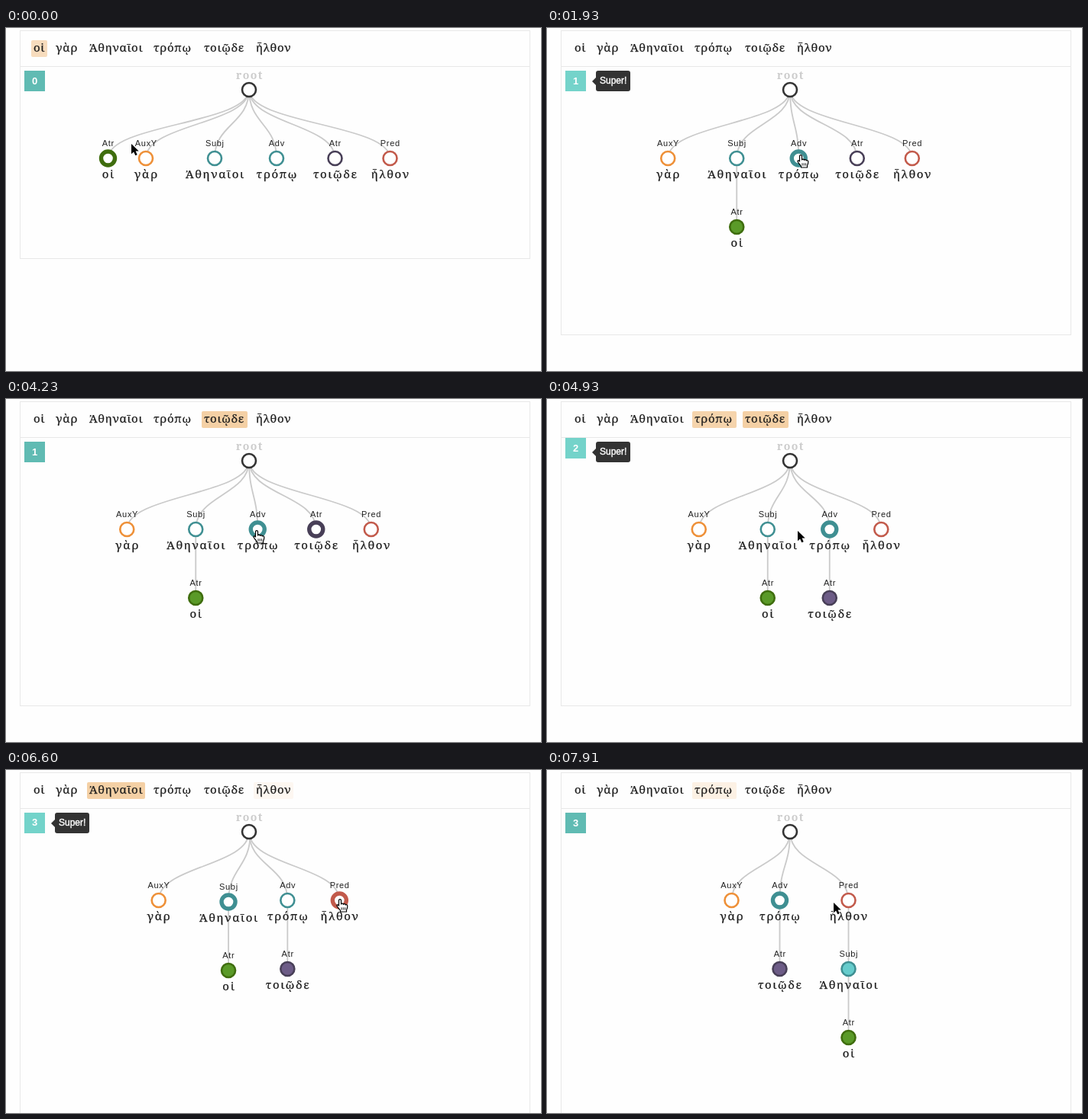
These frames come from a looping animation (700 px wide and 450 px high, 8000 ms). An HTML page:

```html
<!DOCTYPE html>
<html lang="en">
<head>
<meta charset="utf-8">
<title>Treebank exercise</title>
<style>
  html, body { margin: 0; width: 100%; height: 100%; overflow: hidden; background: #fefefe; }
  svg { display: block; }
  text { fill: #222; font: 11px "Liberation Sans", Arial, sans-serif; }
  .greek { font: 15px "Noto Serif", "DejaVu Sans", serif; letter-spacing: .7px;
    fill: #1c1c1c; stroke: #1c1c1c; stroke-width: .25px; }
  .tree { letter-spacing: 1.65px; text-anchor: middle; }
  .label { letter-spacing: .7px; text-anchor: middle; }
  .root { font: bold 14px "Noto Serif", serif; letter-spacing: 1.4px; text-anchor: middle; fill: #ccc; }
  .count { font-size: 13px; font-weight: bold; text-anchor: middle; fill: #fff; }
  .tip { font-size: 12px; fill: #fff; stroke: #fff; stroke-width: .4px; }
  .frame { fill: none; stroke: #e8e8e8; }
  .link { fill: none; stroke: #cacaca; stroke-width: 1.8px; }
</style>
</head>
<body>
<svg id="stage" width="700" height="450" viewBox="0 0 700 450"></svg>
<script>
const LOOP = 8000, STEPS = 91, STEP = LOOP / STEPS;
const ROOT = { x: 318, y: 81 }, LEVEL = 90, UNIT = 4.5, MOVE_TIME = 500;
const RING_REACH = 13, HAND_REACH = 19.3;

const words = [
  { text: 'οἱ', tag: 'Atr', w: 21, ring: '#3f6d0e', fill: '#5a9a28' },
  { text: 'γὰρ', tag: 'AuxY', w: 36, ring: '#ee9038', fill: '#fff' },
  { text: 'Ἀθηναῖοι', tag: 'Subj', w: 76, ring: '#3f8f92', fill: '#66cccc' },
  { text: 'τρόπῳ', tag: 'Adv', w: 58, ring: '#3f8f92', fill: '#66cccc' },
  { text: 'τοιῷδε', tag: 'Atr', w: 60, ring: '#483f57', fill: '#6d5c87' },
  { text: 'ἦλθον', tag: 'Pred', w: 52, ring: '#c25a4b', fill: '#fff' }
];

// A word is picked, then dropped on its head; times are in steps
const acts = [
  { child: 0, head: 2, pick: -5, drop: 7.45, clear: 17, hush: 40 },
  { child: 4, head: 3, pick: 39.5, drop: 49.8, clear: 57, hush: 60 },
  { child: 2, head: 5, pick: 66.5, drop: 74, clear: 82, hush: 85 },
  { child: 3, head: -1, pick: 88, drop: Infinity, clear: Infinity, hush: Infinity }
];

// Where the pointer rests
const stops = [
  { from: 0, to: 0, x: 164, y: 152 },
  { from: 5, to: 17, x: 268, y: 172 },
  { from: 22, to: 25, x: 332, y: 167 },
  { from: 28, to: 39, x: 404, y: 168 },
  { from: 45, to: 59, x: 328, y: 173 },
  { from: 63, to: 66, x: 289, y: 172 },
  { from: 72, to: 76, x: 437, y: 170 },
  { from: 80, to: 83, x: 365, y: 172 },
  { from: 87, to: 88, x: 304, y: 172 },
  { from: 90, to: STEPS, x: 375, y: 174 }
];

const clamp = v => Math.min(1, Math.max(0, v));
const lerp = (a, b, p) => a + (b - a) * p;
const mix = (a, b, p) => ({ x: lerp(a.x, b.x, p), y: lerp(a.y, b.y, p) });
const ease = p => p < .5 ? 4 * p ** 3 : 1 - 4 * (1 - p) ** 3;
const bump = (t, mid, width) => Math.exp(-(((t - mid) / width) ** 2));
const near = (a, b, reach) => Math.hypot(a.x - b.x, a.y - b.y) < reach;
const size = i => Math.max(words[i].text.normalize('NFC').length, words[i].tag.length);
const dropped = k => acts.filter(a => k >= a.drop);

// Tidy tree: neighbours stand apart by their lengths, and so do their descendants
function layout(done) {
  const up = words.map(() => -1);
  acts.slice(0, done).forEach(a => up[a.child] = a.head);
  const chain = i => i < 0 ? [] : [i, ...chain(up.indexOf(i))];
  const chains = words.map((_, i) => i).filter(i => up[i] < 0).map(chain);
  let end = 0;
  const xs = chains.map((c, j) => {
    if (!j) return 0;
    const left = chains[j - 1];
    const gaps = c.slice(0, left.length).map((i, d) =>
      d ? 2 * size(left[d]) + size(i) : 2 * size(i) + size(left[d]));
    return end += UNIT * Math.max(...gaps);
  });
  const at = { '-1': ROOT };
  chains.forEach((c, j) => c.forEach((i, d) => {
    at[i] = { x: ROOT.x + xs[j] - end / 2, y: ROOT.y + LEVEL * (d + 1) };
  }));
  return { up, at, depth: Math.max(...chains.map(c => c.length)) };
}
const layouts = acts.map((_, i) => layout(i));

function glow(i, k) {
  const levels = acts.map(a => {
    const from = i === a.child ? a.pick : i === a.head ? a.drop : Infinity;
    return clamp((k - from) / 6.8) * clamp((a.clear + 3 - k) / 3);
  });
  return Math.max(...levels);
}

const active = (i, k) => acts.some(a =>
  (i === a.child && k >= a.pick && k < a.drop + 5) ||
  (i === a.head && k >= a.drop && k < a.clear + 3));

function pointer(k) {
  const n = stops.findIndex(s => k <= s.to), next = stops[n];
  if (k >= next.from) return next;
  const last = stops[n - 1];
  return mix(last, next, (k - last.to) / (next.from - last.to));
}

function pose(k) {
  const done = dropped(k).length;
  const to = layouts[done], from = layouts[Math.max(0, done - 1)];
  const p = done ? ease(clamp((k - acts[done - 1].drop) * STEP / MOVE_TIME)) : 1;
  return words.map((_, i) => ({
    ...mix(from.at[i], to.at[i], p),
    head: mix(from.at[from.up[i]], to.at[to.up[i]], p)
  }));
}

function sentence(k) {
  let x = 33;
  return words.map((w, i) => {
    const left = x;
    x += w.w + 8;
    return `<rect x="${left}" y="16" width="${w.w}" height="22" rx="2" fill="#f4d0a5" opacity="${glow(i, k)}"/>
      <text class="greek" x="${left + 3}" y="31">${w.text}</text>`;
  }).join('');
}

function tree(k, nodes, tip) {
  const links = nodes.map(({ x, y, head }) => {
    const mid = (head.y + y) / 2;
    return `<path class="link" d="M${head.x} ${head.y}C${head.x} ${mid} ${x} ${mid} ${x} ${y}"/>`;
  });
  const marks = nodes.map((n, i) => {
    const w = words[i], act = acts.find(a => a.child === i);
    const full = act ? clamp(((k - act.drop) * STEP - 100) / 250) : 0;
    const bold = active(i, k) || near(n, tip, RING_REACH);
    return `<circle cx="${n.x}" cy="${n.y}" r="9" fill="#fff"/>
      <circle cx="${n.x}" cy="${n.y}" r="9" fill="${w.fill}" fill-opacity="${full}"
        stroke="${w.ring}" stroke-width="${bold ? 5.4 : 2.6}"/>
      <text class="label" x="${n.x + .35}" y="${n.y - 16}">${w.tag}</text>
      <text class="greek tree" x="${n.x + .8}" y="${n.y + 26}">${w.text}</text>`;
  });
  return `${links.join('')}
    <circle cx="${ROOT.x}" cy="${ROOT.y}" r="9" fill="#fff" stroke="#333" stroke-width="2.6"/>
    <text class="root" x="319" y="67">root</text>${marks.join('')}`;
}

function score(k) {
  const wins = dropped(k), last = wins[wins.length - 1];
  const t = last ? (k - last.drop) * STEP : -LOOP;
  const happy = last && k < last.hush;
  const y = -5 * bump(t, 560, 190);
  const light = happy ? 1 - .45 * bump(t, 310, 100) : 0;
  const praise = `<path d="M59 70L64 65V75Z" fill="#333"/>
    <rect x="64" y="56" width="45" height="27" rx="3" fill="#333"/>
    <text class="tip" x="69" y="73">Super!</text>`;
  return `<g transform="translate(0 ${y})">
    <rect x="24" y="56" width="27" height="27" fill="#60bbb3"/>
    <rect x="24" y="56" width="27" height="27" fill="#74d3ca" opacity="${light}"/>
    <text class="count" x="37.5" y="73.5">${wins.length}</text></g>${happy ? praise : ''}`;
}

function cursor(tip, hand) {
  const shape = hand
    ? `<path fill="#fff" stroke="#000" stroke-width="1.2" stroke-linejoin="round"
        d="M-1.5 8V1C-1.5-.8 1.5-.8 1.5 1V6C2 4.6 4.3 4.8 4.5 6.3C5 5.2 7 5.4 7.2 7
        C8 6.2 9.8 6.6 9.8 8.4C9.8 11 9 12 8.5 13.5V16H.5V14.5C-1 12-3 10.5-3.8 8.6C-4.6 6.8-2.8 6.2-1.5 8Z"/>
      <path stroke="#000" stroke-width=".9" d="M2 10.3V13.6M4.3 10.3V13.6M6.6 10.3V13.6"/>`
    : `<path fill="#000" stroke="#fff" stroke-width="1.4" paint-order="stroke"
        d="M0 0V13.3L3.1 10.5L5.3 15.3L7.7 14.3L5.6 9.6H9.7Z"/>`;
  return `<g transform="translate(${tip.x} ${tip.y})">${shape}</g>`;
}

function render(k) {
  const nodes = pose(k), tip = pointer(k);
  const height = 199 + 100 * layouts[dropped(k).length].depth;
  document.getElementById('stage').innerHTML =
    `<rect class="frame" x="18.5" y="3.5" width="667" height="${height}"/>
     <path class="frame" d="M18.5 50.5H685.5"/>` +
    sentence(k) + tree(k, nodes, tip) + score(k) +
    cursor(tip, nodes.some(n => near(n, tip, HAND_REACH)));
}

// The screen advances in even steps
let shown = -1;
const start = performance.now();
function tick() {
  const t = (performance.now() - start) % LOOP;
  const k = Math.floor((t + 8) / STEP) % STEPS;
  if (k !== shown) render(shown = k);
  requestAnimationFrame(tick);
}
tick();
</script>
</body>
</html>
```
